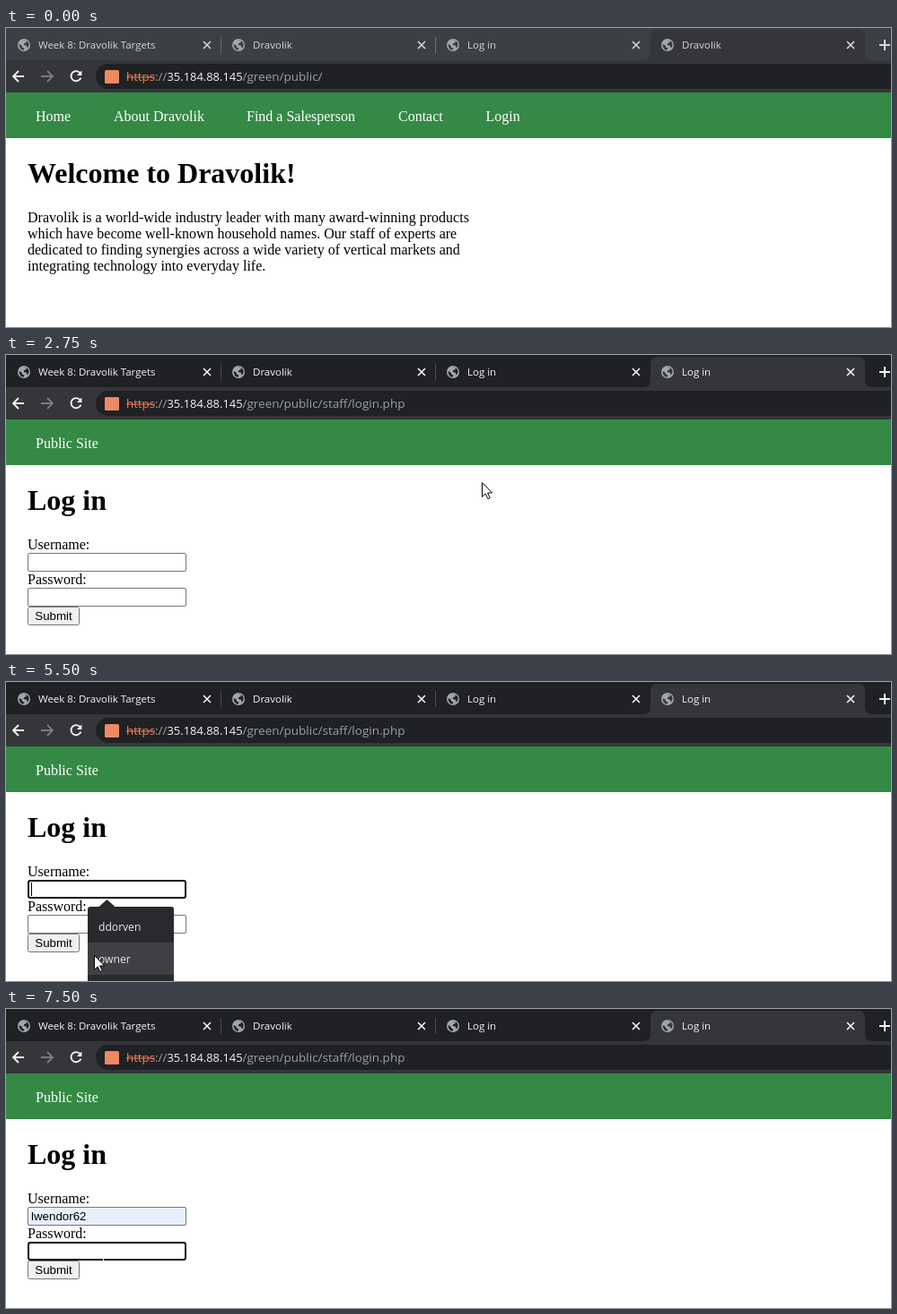
An HTML page for the animation above (8 s loop, 986x334 px).

```html
<!DOCTYPE html>
<html lang="en">
<head>
<meta charset="utf-8">
<title>Log in</title>
<style>
  html, body { margin: 0; width: 100%; height: 100%; overflow: hidden; background: #fff; }
  svg { display: block; width: 100%; height: 100%; }
  text { white-space: pre; }
  .ui { font-family: "Open Sans", "Noto Sans", sans-serif; }
  .page { font-family: "Liberation Serif", "Times New Roman", serif; font-size: 16px; }
  .form { font-family: "Liberation Sans", Arial, sans-serif; font-size: 13.33px; }
  .h1 { font-size: 32px; font-weight: bold; }
</style>
</head>
<body>
<svg id="stage" viewBox="0 0 986 334"></svg>
<script>
const LOOP = 8000, STEP = 250;
const BRAND = 'Dravolik', USER = 'lwendor62';
const stage = document.getElementById('stage');

// Moments when the interface switches state
const AT = { focus: 2000, login: 2250, menu: 4250, filled: 6500, password: 7000 };

// Pointer: time, shape, x, y
const POINTER = [
  [0, 'none', 0, 0],
  [250, 'arrow', 375, 276], [500, 'beam', 404, 232], [750, 'beam', 452, 187],
  [1000, 'arrow', 512, 134], [1250, 'hand', 545, 95], [1500, 'hand', 559, 103],
  [2000, 'hand', 550, 94], [2250, 'arrow', 554, 97], [2500, 'arrow', 546, 112],
  [2750, 'arrow', 530, 142], [3000, 'arrow', 516, 160], [3250, 'arrow', 440, 178],
  [3500, 'arrow', 310, 202], [3750, 'arrow', 170, 226], [4000, 'beam', 80, 230],
  [4250, 'beam', 69, 237], [4500, 'beam', 71, 238], [5250, 'arrow', 84, 270],
  [5500, 'arrow', 98, 305], [5750, 'arrow', 103, 326], [6000, 'arrow', 107, 331],
  [6250, 'arrow', 110, 325], [6500, 'arrow', 109, 300], [6750, 'beam', 109, 280],
  [7000, 'beam', 108, 272]
];

const SHAPES = {
  none: '',
  arrow: '<path d="M.5 .5V16.5L4.2 13L6.9 18.7L9.3 17.6L6.6 12H11.6Z" fill="#fff" stroke="#000"/>',
  beam: '<path d="M-2.5 .5H3.5M.5 .5V16.5M-2.5 16.5H3.5" fill="none" stroke="#fff"/>',
  hand: '<path d="M4.5 14V2.2Q4.5 .6 6 .6T7.5 2.2V7Q9.8 5.8 10.4 7.6Q12.6 6.8 13.1 8.6Q16 8 16 10.8V15Q16 18 14 20V23.4H6V20.5L1 14.4Q-.2 12.2 1.6 11.8Q3 11.7 4.5 14Z" fill="#fff" stroke="#000"/><path d="M7.5 7V12M10.4 8V12M13.1 9V12" stroke="#000"/>'
};

const rect = (x, y, w, h, fill, extra = '') =>
  `<rect x="${x}" y="${y}" width="${w}" height="${h}" fill="${fill}" ${extra}/>`;
const text = (x, y, s, cls, fill = '#000', extra = '') =>
  `<text x="${x}" y="${y}" class="${cls}" fill="${fill}" ${extra}>${s}</text>`;
const ui = (x, y, s, size, fill, extra = '') =>
  text(x, y, s, 'ui', fill, `font-size="${size}" ${extra}`);
const line = (d, color, width = 1.6) =>
  `<path d="${d}" fill="none" stroke="${color}" stroke-width="${width}"/>`;

function globe(x, y, back) {
  return `<g transform="translate(${x} ${y})"><circle r="7" fill="#a3a6a9"/>
    <path d="M-5.6 -1L-2.4 .6L-1.8 2.8L.5 3.5L-.6 5.8Q-4.8 5.2 -5.6 -1ZM-.6 -5.6L3.1 -4.6L2.2 -2.6L.2 -2L-.2 0L2.8 .7L3.7 3.6Q6.2 1.4 5.5 -1.6Q4.2 -5.6 -.6 -5.6Z" fill="${back}"/></g>`;
}

function tab(i, title, back, ink) {
  const x = 239 * i;
  return globe(x + 20, 19, back) + ui(x + 36, 23, title, 11.5, ink) +
    line(`M${x + 220} 15l8 8m0 -8l-8 8`, ink);
}

function browser(t) {
  const focused = t >= AT.focus, login = t >= AT.login;
  const strip = focused ? '#202124' : '#3c3f43', ink = focused ? '#f4f5f6' : '#d5d7da';
  const titles = [`Week 8: ${BRAND} Targets`, BRAND, 'Log in', login ? 'Log in' : BRAND];
  const path = '/green/public/' + (login ? 'staff/login.php' : '');
  return rect(0, 0, 986, 36, strip) + rect(0, 36, 986, 36, '#35363a') +
    '<path d="M710 36Q718 36 718 28V10Q718 2 726 2H949Q957 2 957 10V28Q957 36 965 36Z" fill="#35363a"/>' +
    titles.map((s, i) => tab(i, s, i == 3 ? '#35363a' : strip, ink)).join('') +
    line('M239.5 10V28M478.5 10V28', focused ? '#4a4c50' : '#6a6d71', 1) +
    line('M973 19H985M979 13V25', ink, 2) +
    line('M20 54H8M14 48L8 54L14 60', '#f1f3f4', 1.8) +
    line('M39 54H52M46 48L52 54L46 60', '#7b7d81', 1.8) +
    line('M82.6 50.3A5.6 5.6 0 1 0 83.4 55.6', '#f1f3f4', 1.9) +
    '<path d="M84.4 47.5V53H78.9Z" fill="#f1f3f4"/>' +
    rect(100, 40, 920, 28, '#202124', 'rx="14"') +
    rect(110, 47, 16, 15, '#ee8a62', 'rx="1.5"') +
    ui(134, 59, 'https', 13.3, '#ee7f58') + line('M134 55H166', '#ee7f58', 1) +
    ui(166, 59, '://', 13.3, '#9aa0a6') +
    ui(179.5, 59, '35.184.88.145', 12.9, '#f4f5f6') +
    ui(263.5, 59, path, 13.5, '#9aa0a6') +
    rect(0, 72, 986, 51, '#348945');
}

function home() {
  const links = [[33, 'Home'], [120, `About ${BRAND}`], [268, 'Find a Salesperson'], [437, 'Contact'], [534.5, 'Login']];
  const lines = [
    `${BRAND} is a world-wide industry leader with many award-winning products`,
    'which have become well-known household names. Our staff of experts are',
    'dedicated to finding synergies across a wide variety of vertical markets and',
    'integrating technology into everyday life.'
  ];
  return links.map(([x, s]) => text(x, 104, s, 'page', '#fff')).join('') +
    text(24, 173, `Welcome to ${BRAND}!`, 'page h1') +
    lines.map((s, i) => text(24, 217 + 18 * i, s, 'page')).join('');
}

function field(y, active, fill = '#fff') {
  return active
    ? rect(25, y + 1, 175, 19, fill, 'rx="2" stroke="#101010" stroke-width="2"')
    : rect(24.5, y + .5, 176, 20, fill, 'rx="1.5" stroke="#767676"');
}

const caret = (x, y) => rect(x, y, 1, 15, '#000');
const blink = (t, start) => Math.floor((t - start) / 500) % 2 == 0;

function login(t) {
  const filled = t >= AT.filled, pass = t >= AT.password, user = t >= AT.menu && !pass;
  let s = text(33, 104, 'Public Site', 'page', '#fff') +
    text(24, 173, 'Log in', 'page h1') +
    text(24, 217, 'Username:', 'page') + field(221, user, filled ? '#e8f0fe' : '#fff') +
    text(24, 256, 'Password:', 'page') + field(260, pass) +
    rect(24.5, 281.5, 57, 20, '#efefef', 'rx="2" stroke="#767676"') +
    text(53, 296, 'Submit', 'form', '#000', 'text-anchor="middle"');
  if (filled) s += text(28, 236, USER, 'form');
  if (user && blink(t, filled ? AT.filled : AT.menu)) s += caret(filled ? 90 : 28, 224);
  if (pass && blink(t, AT.password)) s += caret(28, 263);
  return s + (user && !filled ? menu(t) : '');
}

function menu(t) {
  const hover = t >= 5750 ? 2 : t >= 5500 ? 1 : t >= 5250 ? 0 : -1;
  return '<path d="M103 251.5L112.5 243L122 251.5Z" fill="#292a2d"/>' +
    rect(91, 251, 96, 120, '#292a2d', 'rx="3"') +
    (hover < 0 ? '' : rect(91, 255 + 36 * hover, 96, 36, '#3f4043')) +
    ['ddorven', 'owner', USER].map((s, i) => ui(103, 278 + 36 * i, s, 12.1, '#e8eaed')).join('');
}

function pointer(t) {
  const [, shape, x, y] = POINTER.findLast(p => p[0] <= t);
  return `<g transform="translate(${x} ${y})">${SHAPES[shape]}</g>`;
}

function draw(t) {
  stage.innerHTML = browser(t) + (t < AT.login ? home() : login(t)) + pointer(t);
}

const start = performance.now();
let shown = 0;
draw(0);
requestAnimationFrame(function tick() {
  const t = Math.floor((performance.now() - start) % LOOP / STEP) * STEP;
  if (t != shown) draw(shown = t);
  requestAnimationFrame(tick);
});
</script>
</body>
</html>
```
